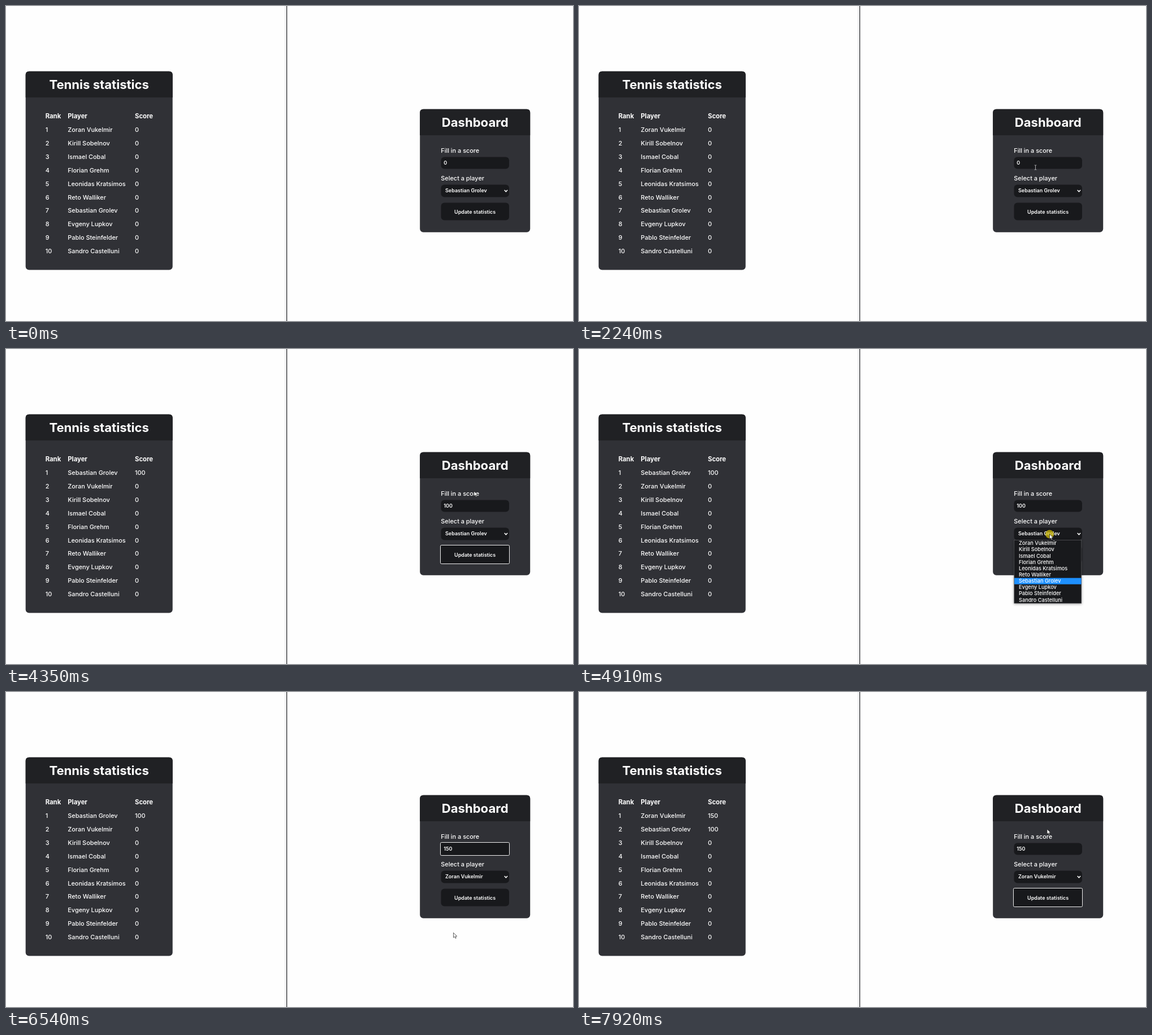
An HTML page that plays this animation: 1003 px wide and 558 px high, repeating every 8000 ms.

```html
<!DOCTYPE html>
<html lang="en">
<head>
<meta charset="utf-8">
<title>Tennis statistics</title>
<style>
html, body { margin: 0; width: 100%; height: 100%; overflow: hidden; background: #fefefe; }
svg { display: block; width: 1003px; height: 558px; font-family: Inter, sans-serif; fill: #fff; }
.title { font-size: 22.1px; font-weight: 700; text-anchor: middle; }
.head { font-size: 11.3px; font-weight: 700; }
.body { font-size: 10.9px; font-weight: 500; }
.small { font-size: 9px; font-weight: 600; }
.option { font-size: 9.2px; font-weight: 500; }
.center { text-anchor: middle; }
</style>
</head>
<body>
<svg id="stage" viewBox="0 0 1003 558"></svg>
<script>
const LOOP = 8000, ROW = 23.9, OPTION = 11.15;
const DARK = '#18191c';
const stage = document.getElementById('stage');
const players = ['Zoran Vukelmir', 'Kirill Sobelnov', 'Ismael Cobal', 'Florian Grehm',
  'Leonidas Kratsimos', 'Reto Walliker', 'Sebastian Grolev', 'Evgeny Lupkov',
  'Pablo Steinfelder', 'Sandro Castelluni'];

function add(tag, attrs, parent = stage) {
  const el = document.createElementNS('http://www.w3.org/2000/svg', tag);
  for (const k in attrs) el.setAttribute(k, attrs[k]);
  return parent.appendChild(el);
}
function text(x, y, cls, str = '', parent = stage) {
  const el = add('text', { x, y, class: cls }, parent);
  el.textContent = str;
  return el;
}
function box(x, y, width, height, fill, rx = 0, parent = stage) {
  return add('rect', { x, y, width, height, fill, rx }, parent);
}
function card(x, y, w, h, title) {
  box(x, y, w, h, '#303136', 6);
  add('path', { d: `M${x} ${y + 46.3}V${y + 6}q0-6 6-6h${w - 12}q6 0 6 6v40.3z`, fill: '#202124' });
  text(x + w / 2, y + 30.8, 'title', title);
}
// Dark control with a hidden focus ring
function control(y, h) {
  box(769.5, y, 120.5, h, DARK, 6);
  return add('rect', {
    x: 768.5, y: Math.round(y) - 1.5, width: 122, height: Math.round(h) + 2,
    rx: 2, fill: DARK, stroke: '#eee'
  });
}
function show(el, on) { el.setAttribute('visibility', on ? 'visible' : 'hidden'); }
function put(el, str) { if (el.textContent !== str) el.textContent = str; }

// Divider
box(493, 0, 3, 558, '#eeeeef');
box(496, 0, 1.3, 558, '#303134');

// Ranking
card(34.7, 115.7, 260, 351.8, 'Tennis statistics');
text(69.7, 199, 'head', 'Rank');
text(109.3, 199, 'head', 'Player');
text(228, 199, 'head', 'Score');
const rows = players.map((_, i) => {
  const y = 223 + i * ROW;
  text(69.7, y, 'body', i + 1);
  return [text(109.3, y, 'body'), text(228, y, 'body')];
});

// Form
card(732.2, 182.7, 195, 218, 'Dashboard');
text(769.3, 260, 'body', 'Fill in a score');
text(769.3, 308.8, 'body', 'Select a player');
const rings = { score: control(267.5, 21), player: control(316.5, 22), button: control(348.5, 31) };
const scoreText = text(774.3, 281.4, 'small');
const playerText = text(777, 330.3, 'small');
add('path', { d: 'M881.7 326l2.7 2.8 2.7-2.8', fill: 'none', stroke: '#fff', 'stroke-width': 1.5 });
text(829.7, 367.7, 'small center', 'Update statistics');

// Dropdown
const menu = add('g', { style: 'filter:drop-shadow(0 1px 2px #0006)' });
add('rect', { x: 769.8, y: 338.5, width: 119, height: 112, fill: DARK, stroke: '#66676a', 'stroke-width': .6 }, menu);
const hover = box(770.1, 0, 118.4, OPTION, '#1e90ff', 0, menu);
players.forEach((p, i) => text(778, 347.2 + i * OPTION, 'option', p, menu));

// Pointer
const spot = add('circle', { r: 7.5, fill: '#dcc80a', opacity: .7 });
const arrow = add('path', {
  d: 'M0 0V8.6L2 6.8 3.4 9.9 4.8 9.3 3.5 6.3H6.2Z', stroke: '#222', 'stroke-width': .7
});
const beam = add('path', {
  d: 'M-1.8-4h1.3q.5 0 .5.5v7q0 .5-.5.5h-1.3M1.8-4H.5Q0-4 0-3.5M0 3.5q0 .5.5.5h1.3',
  fill: 'none', stroke: '#d0d0d2', 'stroke-width': .8
});

// The session is a script of pointer moves and state changes on one clock
let clock = 0;
const moves = [], clicks = [], changes = [];
const state = { focus: '', score: '0', player: 6, open: false, hover: 6, points: {} };
const first = { ...state };

function set(values) {
  Object.assign(state, values);
  changes.push({ time: clock, values });
}
function wait(ms) { clock += ms; }
function go(x, y, ms) {
  moves.push({ start: clock, ms, x, y });
  wait(ms);
}
function click(values) {
  clicks.push(clock);
  set(values);
}
function type(str) {
  for (let i = 1; i <= str.length; i++) {
    wait(100);
    set({ score: str.slice(0, i) });
  }
}
function submit() { set({ points: { ...state.points, [state.player]: Number(state.score) } }); }

go(972, 531, 30);
go(832, 262, 670);
go(826, 328, 560);
wait(380);
go(807.5, 286, 600);
go(800, 279, 460);
click({ focus: 'score' });
wait(150);
type('100');
go(816.5, 367, 500);
wait(90);
click({ focus: 'button' });
wait(100);
submit();
go(828, 252, 510);
go(832.5, 328, 440);
click({ focus: '', open: true, hover: 6 });
wait(270);
go(832, 343, 140);
set({ hover: 0 });
wait(60);
click({});
wait(90);
set({ focus: 'player', open: false, player: 0 });
go(833, 331, 140);
wait(180);
go(820, 279, 280);
click({ focus: 'score' });
wait(30);
type('150');
go(791.5, 426.5, 250);
go(829, 365, 660);
wait(300);
click({ focus: 'button' });
wait(190);
submit();
go(828, 243, 230);

function pointer(t) {
  let x = 972, y = 531;
  for (const m of moves) {
    const u = Math.min(1, Math.max(0, (t - m.start) / m.ms));
    const ease = u * u * (3 - 2 * u);
    x += (m.x - x) * ease;
    y += (m.y - y) * ease;
  }
  return [x, y];
}

function draw(t) {
  const now = Object.assign({}, first, ...changes.filter(c => c.time <= t).map(c => c.values));
  const ranking = players.map((name, i) => ({ name, score: now.points[i] || 0 }));
  ranking.sort((a, b) => b.score - a.score);
  rows.forEach(([name, score], i) => {
    put(name, ranking[i].name);
    put(score, String(ranking[i].score));
  });

  put(scoreText, now.score);
  put(playerText, players[now.player]);
  for (const k in rings) show(rings[k], k === now.focus);
  show(menu, now.open);
  hover.setAttribute('y', 338.7 + now.hover * OPTION);

  const [x, y] = pointer(t);
  const inField = y > 267 && y < 289 && x > 769 && x < 890;
  for (const el of [spot, arrow, beam]) el.setAttribute('transform', `translate(${x} ${y})`);
  show(spot, clicks.some(c => t >= c && t < c + 190));
  show(arrow, t >= 30 && !inField);
  show(beam, t >= 30 && inField);
}

const began = performance.now();
function tick() {
  draw((performance.now() - began) % LOOP);
  requestAnimationFrame(tick);
}
draw(0);
requestAnimationFrame(tick);
</script>
</body>
</html>
```
